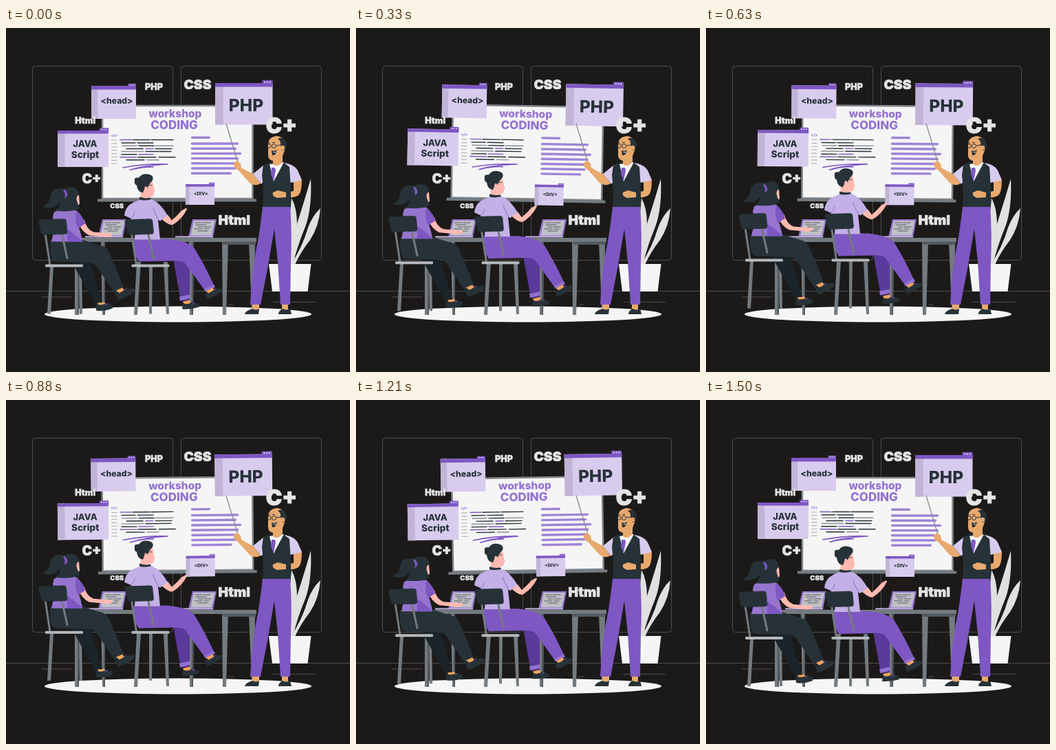
Recreate the animation shown at these times as an HTML page. Size 500 by 500 pixels, loop 1540 ms.

```html
<!DOCTYPE html>
<html lang="en">
<head>
<meta charset="utf-8">
<title>Coding workshop</title>
<style>
  html, body { margin: 0; width: 100%; height: 100%; overflow: hidden; background: #1c1a19; }
  svg { display: block; width: 100vw; height: 100vh; }
  text { font-family: Inter, sans-serif; font-weight: 800; text-anchor: middle; }
  .line { fill: none; stroke-linecap: round; stroke-linejoin: round; }
  .dark { fill: #263238; }
  .purple { fill: #7e57c2; }
  .lilac { fill: #d8ccee; }
  .gray { fill: #737b80; }
  .pink { fill: #ffb9b0; }
  .tan { fill: #e8a96d; }
  .pale { fill: #f5f5f5; }
  #labels { font-weight: 900; fill: #e4e4e4; stroke: #e4e4e4; }
</style>
</head>
<body>
<svg viewBox="0 0 500 500">
  <g fill="none" stroke="#55534f" stroke-width=".9">
    <rect x="38.5" y="55.5" width="204" height="282" rx="4"/>
    <rect x="254.5" y="55.5" width="204" height="282" rx="4"/>
    <path d="M0 382.5H500M52 391H96M323 402h8M388 398.5H450"/>
  </g>
  <ellipse class="pale" cx="250" cy="416" rx="194" ry="11.5"/>

  <g id="board">
    <rect x="140" y="113" width="218.5" height="135" class="pale" stroke="#83878c" stroke-width="2.5"/>
    <path class="gray" d="M133 248.5H364V252.5H133Z"/>
    <g fill="#9371d0">
      <text x="246" y="130" font-size="15.5">workshop</text>
      <text x="244.5" y="147" font-size="17">CODING</text>
      <text x="157.3" y="158" font-size="5.5">&lt;/&gt;</text>
    </g>
    <g id="notes"></g>
    <path class="line" stroke="#7e57c2" stroke-width="1.6" d="M170 203Q200 197 235 198Q198 200 180 206.5Q200 201 214 202"/>
    <g id="windows"></g>
  </g>

  <g id="labels"></g>

  <g id="plant">
    <g fill="#e0e0e0">
      <path d="M411 344Q417 302 426 275Q435 247 443 219Q445 262 435 289Q423 318 417 344Z"/>
      <path d="M414 344Q431 318 439 290Q446 272 457 262Q455 288 442 308Q428 326 420 344Z"/>
      <path d="M412 344Q409 300 415 247Q423 262 423 285Q420 315 415 344Z"/>
    </g>
    <path class="pale" d="M382 343H443.5L438.5 383H387Z"/>
  </g>

  <g id="table">
    <g class="gray">
      <path d="M97 305H364V311H97Z"/>
      <path d="M100 311h7l-1 106h-6ZM138 311h6v106h-4ZM266 311h7l-1 106h-5ZM314 311h9l-3 106h-5ZM353 311h9l-1 95h-4Z"/>
      <path d="M190 340h6l-5 77h-5ZM229 340h6l2 76h-4Z"/>
    </g>
    <path fill="#525a5f" d="M315 310.5H363V315H315ZM104 311h3l-1 106h-2ZM142 311h2v106h-2ZM270 311h3l-1 106h-2Z"/>
    <g id="laptop">
      <path fill="#9575cd" d="M140 278H175L170 304H134Z"/>
      <path fill="#bfc0c6" d="M142 280H172.5L168 301.5H137.5Z"/>
      <path class="line" stroke="#263238" stroke-width=".7" d="M144 283h9m2 0h11M145 286h15M148 289h7m2 0h10M143 292h11m3 0h7M148 295h14"/>
      <path fill="#c9b8e8" d="M115 302.5H170V304.5H115Z"/>
    </g>
    <use href="#laptop" x="131"/>
  </g>

  <g id="students">
    <path class="gray" d="M64 347h5l-4 69h-5ZM106 347h4l1 69h-4ZM208 347h5l-1 69h-4Z"/>

    <!-- woman -->
    <path fill="#1b2429" d="M84 320L118 328L140 399L130 402Z"/>
    <path class="dark" d="M64 309Q62 338 72 340L112 341Q126 340 131 346L158 386L172 380Q158 345 149 325Q145 317 132 315L110 308Z"/>
    <path fill="#f2a45c" d="M133 400l10-1 3 4-11 2ZM160 382l9-4 4 5-8 3Z"/>
    <path class="dark" d="M130 401Q137 405 145 401L155 403V408Q142 413 131 411ZM158 386Q166 387 172 381L186 379L187 383Q177 392 163 396Z"/>
    <path class="line" stroke="#7e57c2" d="M144 403l4-2M171 382l4-3"/>
    <path class="pink" d="M104 276L114 280Q117 293 127 297L150 299Q156 297 155 302Q150 306 143 304L121 302Q110 297 104 282Z"/>
    <path fill="#9675cf" d="M70 268Q88 260 103 266Q113 276 115 285L106 291Q110 302 111 311H66Q72 288 68 275Z"/>
    <path class="purple" d="M102 266Q113 276 115 285L104 291Q99 279 102 266ZM89 293Q101 300 111 311H89Z"/>
    <path class="pink" d="M97 238L106 243 107 256 101 263Z"/>
    <path class="dark" d="M85 234Q103 226 107 243Q100 244 104 255L107 262Q98 269 71 266Q80 260 78 254Q68 266 53 260Q62 257 64 247Q66 231 85 234Z"/>
    <path class="purple" d="M85 235Q90 239 89 245L85 248Q87 241 83 237Z"/>

    <!-- man -->
    <path fill="#5a3a9a" d="M242 331L267 335L267 396L254 397Z"/>
    <path class="purple" d="M186 307H235Q266 310 274 321Q289 345 303 376L289 382L260 342Q255 338 240 339L193 340Q184 328 186 307Z"/>
    <path fill="#9371d0" d="M252 391l15-3 1 5-15 4ZM288 380l14-7 2 4-14 7Z"/>
    <path fill="#f2a45c" d="M257 398l10-2 2 5-10 2ZM291 383l9-5 4 4-9 5Z"/>
    <path class="dark" d="M257 400Q263 404 270 399L281 402V406Q268 410 256 409ZM289 386Q297 387 303 380L314 379V383Q304 391 292 395Z"/>
    <path class="line" stroke="#7e57c2" d="M270 402l4-2M301 382l4-3"/>
    <path class="pink" d="M224 276L235 272Q239 277 241 280Q249 273 255 266L262 262L263 264L259 271Q250 283 241 287Q234 286 224 276Z"/>
    <path fill="#c3b0e6" d="M180 257Q195 247 211 249Q224 254 235 273L224 281L221 279L224 308H187Q189 290 181 277L172 273Q173 263 180 257Z"/>
    <path class="line" stroke="#7e57c2" stroke-width=".8" d="M221 278Q215 268 214 262M181 277Q187 273 187 268"/>
    <path class="pink" d="M195 229L211 221Q215 227 215 234L217 238L215 240Q216 247 208 246L209 250H196Z"/>
    <path class="dark" d="M187 222Q186 217 193 218Q198 211 207 213Q216 215 213 222Q207 228 206 233Q202 227 201 235L199 240Q191 239 190 229Q186 228 187 222ZM194 246Q203 249 210 247L211 249.5Q203 252 194 250Z"/>
    <path class="line" stroke="#263238" stroke-width=".9" d="M208 229h4"/>

    <g id="chair">
      <path class="line" stroke="#737b80" stroke-width="3" d="M57 299L64 345M81 299L89 335"/>
      <path class="dark" stroke="#1e282d" stroke-width=".5" d="M50 279L84 278Q87 278 87.5 281L89 297Q89 300 86 300L55 301Q52 301 51 298L47.5 283Q47 279 50 279Z"/>
      <rect x="57" y="344" width="55" height="4" rx="1.5" fill="#b4b9bd"/>
    </g>
    <use href="#chair" x="125.5"/>
  </g>

  <g id="teacher">
    <path class="line" stroke="#8b8b8b" stroke-width="1.3" d="M320 139L339 202"/>
    <path class="tan" d="M360 213L370 226Q362 231 354 225L338 207Q330 203 331 196L336 193L341 197L342 203Z"/>
    <path class="tan" d="M418 220L430 220Q430 237 426 242Q422 247 409 246L394 247Q386 244 388 239L395 236L407 239L418 237Z"/>
    <path class="tan" d="M358 401h10v9h-10ZM401 401h9v9h-9Z"/>
    <path class="dark" d="M358 408Q363 411 368 408L367 416H347Q348 411 358 408ZM402 408Q408 411 413 408L415 416H396Q396 411 402 408Z"/>
    <path class="purple" d="M373 259H413Q416 300 414 340L413 402H399L395 340L390 292L380 350L370 402H355Q357 350 367 305Q371 278 373 259Z"/>
    <path class="lilac" d="M375 199L359 212L371 227L378 218ZM405 196Q420 199 424 207L430 221L414 225L408 217Z"/>
    <path class="dark" d="M374 199L384 195H403L412 202L414 234V260H373Q375 235 372 214Z"/>
    <path class="pale" d="M383 198L404 195L389 223Z"/>
    <path class="purple" d="M386 203h5l1 4-3 15-4-9Z"/>
    <path class="tan" d="M395 236L407 239V246L394 247Q386 244 388 239Z"/>
    <path class="tan" d="M381 170Q381 158 394 157Q407 159 407 173L402 186V194Q395 204 388 198V193Q380 192 381 182Z"/>
    <path class="dark" d="M395 161Q407 156 408 171Q407 178 402 178L399 170Q400 164 395 161ZM386 178Q391 180 394 177Q392 186 387 185Z"/>
    <path class="pale" d="M386.5 179.5Q390 181 393 179.5L391 181.5Z"/>
    <g fill="none" stroke="#263238" stroke-width="1">
      <circle cx="382.5" cy="171.5" r="2.7"/>
      <circle cx="389.5" cy="171.5" r="3"/>
      <path d="M392.5 171L400 170M381 167h3M387 166.500h4"/>
    </g>
    <circle class="tan" cx="402" cy="174" r="3.2"/>
  </g>
</svg>
<script>
const LOOP = 1540, LEAD = .02;
const byId = id => document.getElementById(id);
const label = (text, x, y, size, attrs = '') =>
  `<text x="${x}" y="${y}" font-size="${size}" ${attrs}>${text.replace(/</g, '&lt;')}</text>`;
const rect = (x, y, w, h, fill) =>
  `<rect x="${x}" y="${y}" width="${w}" height="${h}" fill="${fill}"/>`;
const stroke = (x1, x2, y, color, width) =>
  `<path class="line" d="M${x1} ${y}H${x2}" stroke="${color}" stroke-width="${width}"/>`;

// A floating browser window with a tab at its top right corner
function browser(x, y, w, h, bar, tab, content) {
  const tabHeight = tab * .28, right = x + w;
  const dots = [.25, .5, .75].map(k =>
    `<circle cx="${right - tab * k}" cy="${y - tabHeight / 3}" r="${tab * .065}" fill="#fff"/>`).join('');
  return rect(x, y, w, h, '#d8ccee') + rect(x, y, w * .14, h, '#c1b4d6') +
    rect(x, y, w, bar, '#7e57c2') + rect(right - tab, y - tabHeight, tab, tabHeight + 1, '#7e57c2') +
    dots + `<g fill="#263238">${content}</g>`;
}

byId('windows').innerHTML =
  browser(124, 84, 65, 48, 5.5, 11.5, label('<head>', 161, 110.5, 12.2)) +
  browser(75, 149, 74, 53, 4.5, 13, label('JAVA', 115, 173.5, 13) + label('Script', 115, 189, 13.6)) +
  browser(304, 80, 83.5, 60.5, 5.5, 15, label('PHP', 349, 121, 24.5)) +
  browser(261, 227, 42, 30, 3.5, 8, label('<DIV>', 283.5, 243.3, 6.6));

byId('labels').innerHTML = [
  ['PHP', 215, 90.2, 12.6], ['CSS', 278.5, 88.8, 19.3], ['Html', 115.3, 138.7, 12.5],
  ['C+', 124.5, 225.7, 19.5], ['C+', 400.5, 152.5, 31.5], ['CSS', 161.2, 262, 9.6], ['Html', 331.7, 286, 19.3]
].map(args => label(...args, `style="font-weight:900" stroke-width="${args[3] * .035}"`)).join('');

// Code lines: y, then start, end and colour of each piece
const ink = { p: '#7e57c2', d: '#263238', g: '#8d8f93' };
const code = [
  [162.5, 166, 182, 'p', 184, 209, 'd', 211, 243, 'd'],
  [167, 168, 188, 'd', 191, 214, 'd'],
  [171.3, 169, 190, 'g', 193, 215, 'd', 217, 243, 'g'],
  [175.5, 175, 199, 'd', 203, 214, 'p', 217, 241, 'd'],
  [179.5, 168, 200, 'g', 203, 240, 'd'],
  [183.7, 168, 190, 'd', 193, 214, 'p'],
  [187.7, 166, 190, 'p', 192, 218, 'd', 222, 246, 'd'],
  [191.8, 175, 201, 'd', 205, 222, 'g']
];
let notes = '';
for (const [y, ...parts] of code)
  for (let i = 0; i < parts.length; i += 3) notes += stroke(parts[i], parts[i + 1], y, ink[parts[i + 2]], 1.4);
for (let i = 0; i < 8; i++) notes += stroke(153.5, 161, 163 + i * 4.9, '#b5b5b8', 1.2);
[297, 338, 335, 342, 338, 335, 334, 328].forEach((end, i) => {
  notes += stroke(270.5, end - 1.5, i ? 160.8 + i * 7.2 : 159.2, '#9f84d6', 3.4);
});
byId('notes').innerHTML = notes;

const ease = u => u * u * (3 - 2 * u);
const swing = p => p < .25 ? ease(4 * p)
  : p < .75 ? 1 - 2 * ease(2 * p - .5)
  : ease(4 * p - 3) - 1;

function draw() {
  const p = (performance.now() / LOOP + LEAD) % 1;
  const rise = 10 * (1 - Math.abs(2 * p - 1));
  byId('board').setAttribute('transform', `rotate(${swing(p)} 231.5 167)`);
  byId('students').setAttribute('transform', `translate(0 ${-rise})`);
  requestAnimationFrame(draw);
}
draw();
</script>
</body>
</html>
```
